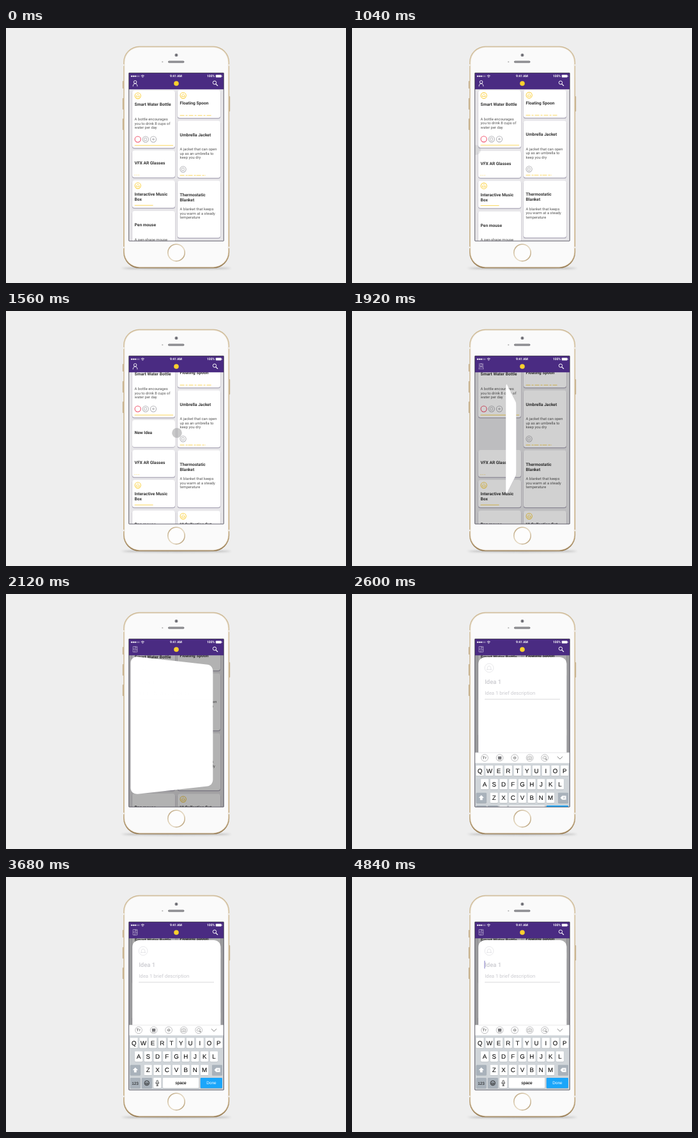
Animation of 533x400 px, one loop 5.08 s. Source, as an HTML page:

```html
<!DOCTYPE html>
<html lang="en">
<head>
<meta charset="utf-8">
<title>New idea card</title>
<style>
  html, body { margin: 0; width: 100%; height: 100%; overflow: hidden; background: #eee; }
  svg { display: block; width: 100%; height: 100%; }
  text { font-family: Roboto, sans-serif; text-rendering: geometricPrecision; white-space: pre; }
  .key { font-family: "Liberation Sans", Arial, sans-serif; text-anchor: middle; }
  .mid { text-anchor: middle; }
  .line { fill: none; stroke-linecap: round; stroke-linejoin: round; }
</style>
</head>
<body>
<svg id="stage" viewBox="0 0 533 400" xmlns="http://www.w3.org/2000/svg"></svg>
<script>
const LOOP = 5080;
const YELLOW = '#fbd34a', PINK = '#f0566f', GREY = '#b4b4b8', PALE = '#cbcbd0', PURPLE = '#4a2b82';

// Shape helpers; text is placed by the middle of its capitals.
const rect = (x, y, w, h, fill, r = 0, more = '') =>
  `<rect x="${x}" y="${y}" width="${w}" height="${h}" rx="${r}" fill="${fill}" ${more}/>`;
const dot = (x, y, r, fill, more = '') =>
  `<circle cx="${x}" cy="${y}" r="${r}" fill="${fill}" ${more}/>`;
const ring = (x, y, r, color, w) => dot(x, y, r, 'none', `stroke="${color}" stroke-width="${w}"`);
const line = (d, color, w, more = '') =>
  `<path class="line" d="${d}" stroke="${color}" stroke-width="${w}" ${more}/>`;
const label = (x, y, s, size, fill, more = '') =>
  `<text x="${x}" y="${y + size * 0.355}" font-size="${size}" fill="${fill}" ${more}>${s}</text>`;
const group = (id, body, more = '') => `<g id="${id}" ${more}>${body}</g>`;

const glyphs = {
  bulb: 'M-2.7 1.7H2.7M-2 1.7V.2C-2-1.2-1-2.2 0-2.2S2-1.2 2 .2V1.7',
  square: 'M-1.7-2.1H1.7V2.1H-1.7Z',
  arrow: 'M-2 0H2M0-1.8V1.8M-1 -.8L1 .8M1-.8L-1 .8',
  none: ''
};
const badge = (x, y, color, kind, r = 4.6, w = 1.1) =>
  ring(x, y, r, color, w) +
  line(glyphs[kind], color, w * 0.8, `transform="translate(${x} ${y}) scale(${r / 4.9})"`);

function card(c) {
  const tx = c.x + 3.6;
  let s = rect(c.x - 0.3, c.y + 0.4, 67.6, c.h + 0.9, '#aaa6b6', 3.6) + rect(c.x, c.y, 67, c.h, '#fff', 3.4);
  if (c.bulb) s += badge(c.x + 8.7, c.y + 8.3, YELLOW, 'bulb');
  c.title.forEach((t, i) => s += label(tx, c.ty + i * 8, t, 6.65, '#333', 'font-weight="700"'));
  (c.text || []).forEach((t, i) => s += label(tx, c.by + i * 6.8, t, 5.85, '#555'));
  (c.badges || []).forEach(([color, kind], i) => s += badge(c.x + 8.6 + i * 12.2, c.iy, color, kind));
  if (c.bar) s += line(`M${tx} ${c.y + c.h - 3.8}h${c.bar}`, YELLOW, 0.9,
    `stroke-dasharray="${c.dash || 'none'}" style="stroke-linecap:butt"`);
  return s;
}

const L = 198, R = 269;
const bottle = card({ x: L, y: 98, h: 90, bulb: 1, title: ['Smart Water Bottle'], ty: 119.5,
  text: ['A bottle encourages', 'you to drink 8 cups of', 'water per day'], by: 142.8,
  badges: [[PINK, 'none'], [GREY, 'square'], [GREY, 'arrow']], iy: 174.6, bar: 60.5 });
const leftCards = [
  { x: L, y: 192, h: 42.5, title: ['VFX AR Glasses'], ty: 212, bar: 9, dash: '1 2' },
  { x: L, y: 239, h: 43, bulb: 1, title: ['Interactive Music', 'Box'], ty: 261, bar: 29 },
  { x: L, y: 287, h: 90, title: ['Pen mouse'], ty: 309, text: ['A pen-shape mouse'], by: 331.5 }
].map(card).join('');
const rightCards = [
  { x: R, y: 97.5, h: 43.5, bulb: 1, title: ['Floating Spoon'], ty: 118, bar: 50, dash: '7 2 3 2' },
  { x: R, y: 145.5, h: 89.5, title: ['Umbrella Jacket'], ty: 167.2,
    text: ['A jacket that can open', 'up as an umbrella to', 'keep you dry'], by: 189.8,
    badges: [[GREY, 'square']], iy: 221.6, bar: 40, dash: '7 2 3 1' },
  { x: R, y: 239.5, h: 89.5, title: ['Thermostatic', 'Blanket'], ty: 261.3,
    text: ['A blanket that keeps', 'you warm at a steady', 'temperature'], by: 283.8 },
  { x: R, y: 334.5, h: 60, bulb: 1, title: ['UI Collection Set'], ty: 356 }
].map(card).join('');

function phone() {
  let s = `<ellipse cx="267" cy="376.8" rx="86" ry="1.6" fill="#777" opacity=".5" filter="url(#soft)"/>`;
  for (const [x, y, h] of [[182.8, 83, 12], [182.8, 110, 18], [182.8, 142, 18], [349.2, 107, 24]])
    s += rect(x, y, 2, h, '#c2ab86', 0.8);
  s += rect(184, 28.6, 166.2, 348.2, 'url(#gold)', 25) + rect(185.3, 29.8, 163.6, 345.6, '#ebe3d6', 24) +
    rect(186.3, 30.8, 161.6, 343.4, '#fafafa', 23);
  for (const y of [57, 343]) s += rect(184, y, 1.4, 2.4, '#f4f2ee') + rect(348.8, y, 1.4, 2.4, '#f4f2ee');
  s += dot(267, 42.5, 2.5, '#8d8d92') + dot(267, 42.5, 1.2, '#5c5c66') + dot(245.3, 53.2, 1.1, '#bbb') +
    rect(254, 51.4, 25.5, 3.4, '#77777b', 1.7) + rect(255, 52.4, 23.5, 1.5, '#98989c', 0.7);
  s += dot(267, 352.4, 13.2, '#fdfdfd', 'stroke="url(#metal)" stroke-width="1.6"');
  return s;
}

function header() {
  let s = rect(192, 69, 150, 27.2, PURPLE);
  for (let i = 0; i < 5; i++)
    s += i < 3 ? dot(197 + i * 2.8, 75.6, 1.2, '#fff') : ring(197 + i * 2.8, 75.6, 0.9, '#fff', 0.4);
  s += line('M211.9 74.8Q214.2 72.8 216.5 74.8M212.9 76Q214.2 74.9 215.5 76', '#fff', 0.8) + dot(214.2, 77.2, 0.6, '#fff');
  s += label(266.5, 75.7, '9:41 AM', 5, '#fff', 'class="mid" font-weight="700"') +
    label(327.3, 75.7, '100%', 5, '#fff', 'text-anchor="end" font-weight="700"');
  s += rect(328.8, 73.5, 8.8, 4.1, '#fff', 0.8) + rect(338, 74.8, 0.8, 1.5, '#fff', 0.3);
  s += group('user', ring(202.5, 84.8, 2.3, '#fff', 0.9) +
    line('M199.1 91.2C199.1 88.8 200.4 87.3 202.5 87.3S205.9 88.8 205.9 91.2', '#fff', 0.9));
  s += group('board', line('M199.5 82.4H205.7V91H199.5ZM202.6 82.4V86.6M199.5 86.4H201.2M203.2 87.6H205.7M202 88V91M203.6 84.4H205', '#d9d2e6', 0.6));
  s += dot(267, 87, 3.8, '#fdd02e');
  s += ring(327, 85.7, 2.7, '#fff', 0.95) + line('M329 87.8L331.7 90.5', '#fff', 1.1);
  return s;
}

function form() {
  return badge(215, 116, '#dedee2', 'bulb', 6.9, 0.7) +
    label(208.2, 137.4, 'Idea 1', 9.5, PALE, 'font-weight="500"') +
    label(208.2, 155.6, 'Idea 1 brief description', 7.75, PALE) +
    rect(208, 164.7, 118, 0.7, '#c6c6ca') +
    rect(207.4, 131.4, 1.1, 12.2, '#8a84c8', 0, 'id="caret"');
}

function keyboard() {
  const DARK = '#a9b2bb', INK = '#111';
  const key = (x, y, w, fill) => rect(x, y + 0.6, w, 16.2, '#a4a9ae', 1.1) + rect(x, y, w, 16.2, fill, 1.1);
  let s = rect(192, 232, 150, 103, '#d0d5d9') + rect(192, 232, 150, 16.4, '#fff') + rect(192, 231.9, 150, 0.5, '#d2d2d5');
  for (let i = 0; i < 5; i++) s += ring(208 + i * 23.55, 240.2, 5.4, '#a6a6a9', 0.7);
  s += label(207.7, 240.3, 'T<tspan font-size="4.6">T</tspan>', 6, '#666', 'class="mid" font-weight="700"');
  s += rect(228.9, 237.8, 5.4, 4.6, '#77777a', 0.5) + line('M229 243.6H234', '#888', 0.6);
  s += line('M252.5 240.2H257.7M255.1 237.3V243.1M253.7 238.7V241.7M256.5 238.7V241.7', '#888', 0.7);
  s += line('M275.7 238.5H277.2L277.8 237.5H279.6L280.2 238.5H281.6V242.8H275.7Z', '#999', 0.7) + ring(278.65, 240.5, 1.2, '#999', 0.6);
  s += line('M299.2 240.2L301.4 237.4L304.6 238.6L303.6 241.8H300.6ZM303.4 242.6H305.6M304.5 241.5V243.7', '#888', 0.7);
  s += line('M322.2 238.4L326 242.2L329.8 238.4', '#777', 0.9);
  ['QWERTYUIOP', 'ASDFGHJKL', 'ZXCVBNM'].forEach((row, r) => {
    const y = 252.2 + r * 21.3;
    [...row].forEach((ch, i) => {
      const x = [200.6, 208, 222.7][r] + i * 14.74;
      s += key(x - 6.1, y, 12.2, '#fff') + label(x, y + 8.2, ch, 9.8, INK, 'class="key" stroke="#111" stroke-width=".12"');
    });
  });
  s += key(194.7, 294.8, 16, DARK) + key(323, 294.8, 16, DARK);
  s += `<path d="M202.7 298.7L206.8 303H204.6V306.4H200.8V303H198.6Z" fill="#fff"/>`;
  s += `<path d="M326.6 302.8L329.6 299.6H335.6V306H329.6Z" fill="#fff"/>` + line('M331 301.4L333.8 304.2M333.8 301.4L331 304.2', DARK, 0.8);
  s += key(194.7, 315, 15.8, DARK) + key(212.9, 315, 15.8, DARK) + key(231.1, 315, 12.2, '#fff') +
    key(245.9, 315, 56.3, '#fff') + key(304.8, 315, 34.2, '#1ba6fa');
  s += label(202.4, 323.3, '123', 6.3, INK, 'class="key"') + label(274, 323.2, 'space', 6.4, INK, 'class="key" stroke="#111" stroke-width=".15"') +
    label(322, 323.2, 'Done', 6.4, '#fff', 'class="key"');
  s += ring(220.8, 323.2, 3.7, INK, 0.8) + line('M218.6 324.1Q220.8 327 223 324.1Z', INK, 0.7) +
    dot(219.5, 322, 0.6, INK) + dot(222.1, 322, 0.6, INK);
  s += rect(236, 319, 2.4, 5, 'none', 1.2, `stroke="${INK}" stroke-width=".7"`) +
    line('M234.7 322.6C234.7 326.4 239.7 326.4 239.7 322.6M237.2 325.5V327.4M235.8 327.5H238.6', INK, 0.7);
  return s;
}

const stage = document.getElementById('stage');
stage.innerHTML = `<defs>
  <linearGradient id="gold" x1="0" y1="0" x2="0" y2="1">
    <stop offset="0" stop-color="#cdb892"/><stop offset=".12" stop-color="#d3c09e"/>
    <stop offset=".5" stop-color="#c9b28a"/><stop offset=".9" stop-color="#c4aa7e"/>
    <stop offset="1" stop-color="#93764b"/>
  </linearGradient>
  <linearGradient id="metal" x1="0" y1="0" x2="1" y2="1">
    <stop offset="0" stop-color="#b39a72"/><stop offset=".35" stop-color="#dccdb2"/>
    <stop offset=".6" stop-color="#e6dac4"/><stop offset="1" stop-color="#a98d60"/>
  </linearGradient>
  <filter id="soft" x="-20%" y="-300%" width="140%" height="700%"><feGaussianBlur stdDeviation="1.6"/></filter>
  <clipPath id="screen"><rect x="192.7" y="70.6" width="148.6" height="263.4"/></clipPath>
</defs>` + rect(0, 0, 533, 400, '#eee') + phone() +
  group('view', rect(192, 69, 150, 266, '#e7e6e9') +
    group('bottle', bottle) + group('left', leftCards) + group('right', rightCards) +
    rect(192, 96, 150, 240, '#000', 0, 'id="dim"') +
    '<path id="shade" fill="#aaa6b6"/><path id="sheet" fill="#fff"/>' +
    label(0, 0, 'New Idea', 6.65, '#333', 'id="name" font-weight="700"') +
    dot(0, 191.3, 7.8, '#a8a8aa', 'id="touch"') +
    group('form', form()) + group('keys', keyboard()) + header(), 'clip-path="url(#screen)"') +
  rect(192.6, 70.5, 148.7, 263.6, 'none', 0.5, 'stroke="#3d3a48" stroke-width=".8"');

const el = id => document.getElementById(id);
const set = (id, name, value) => el(id).setAttribute(name, value);
const fade = (id, v) => set(id, 'opacity', v);
const move = (id, x, y) => set(id, 'transform', `translate(${x} ${y})`);
const span = (t, a, b) => Math.min(1, Math.max(0, (t - a) / (b - a)));
const smooth = p => p * p * (3 - 2 * p);
const mix = (a, b, p) => a + (b - a) * p;

// Rounded rectangle turned about its vertical axis, seen in perspective.
function turnedCard(cx, cy, w, h, r, angle) {
  const depth = 238, pts = [];
  [[1, 1], [-1, 1], [-1, -1], [1, -1]].forEach(([sx, sy], q) => {
    for (let i = 0; i <= 6; i++) {
      const a = (q + i / 6) * Math.PI / 2;
      const u = sx * (w - r) + r * Math.cos(a), v = sy * (h - r) + r * Math.sin(a);
      const k = depth / (depth - u * Math.sin(angle));
      pts.push((cx + u * Math.cos(angle) * k).toFixed(2) + ' ' + (cy + v * k).toFixed(2));
    }
  });
  return 'M' + pts.join('L') + 'Z';
}

function draw(t) {
  const pull = smooth(span(t, 1000, 1560));
  const flip = smooth(span(t, 1560, 2240));
  const angle = flip * Math.PI;

  move('bottle', 0, -21 * pull);
  move('right', 0, -21 * pull);
  move('left', 0, 26 * pull);
  fade('dim', 0.33 * flip);

  const cx = mix(231.5, 267.3, flip) - 75 * (1 - pull), cy = mix(192.3, 207.3, flip);
  const w = mix(33.5, 69.2, flip), h = mix(21.3, 108.2, flip);
  const path = turnedCard(cx, cy, w, h, mix(3.4, 10.5, flip), angle);
  const shown = pull > 0 ? 1 : 0;
  set('sheet', 'd', path);
  set('shade', 'd', path);
  move('shade', 0, 0.9);
  fade('sheet', shown);
  fade('shade', shown * (1 - flip));

  const grow = w / 33.5, cos = Math.cos(angle);
  set('name', 'transform', `translate(${cx - 30 * grow * cos} ${cy - 1.2}) scale(${Math.max(0.001, grow * cos)} ${grow})`);
  fade('name', shown && cos > 0 ? 1 : 0);

  set('touch', 'cx', 193 + 75 * pull);
  fade('touch', 0.62 * span(t, 1000, 1100) * (1 - span(t, 1560, 1760)));

  fade('user', 1 - flip);
  fade('board', flip);
  fade('form', span(t, 2120, 2240));
  fade('caret', (t >= 3280 && t < 3680) || (t >= 4080 && t < 4480) || t >= 4840 ? 1 : 0);

  const rise = 1 - (1 - span(t, 2400, 2840)) ** 3;
  move('keys', 0, 105 * (1 - rise));
  fade('keys', rise > 0 ? 1 : 0);
}

const start = performance.now();
function tick() {
  draw((performance.now() - start) % LOOP);
  requestAnimationFrame(tick);
}
draw(0);
requestAnimationFrame(tick);
</script>
</body>
</html>
```
